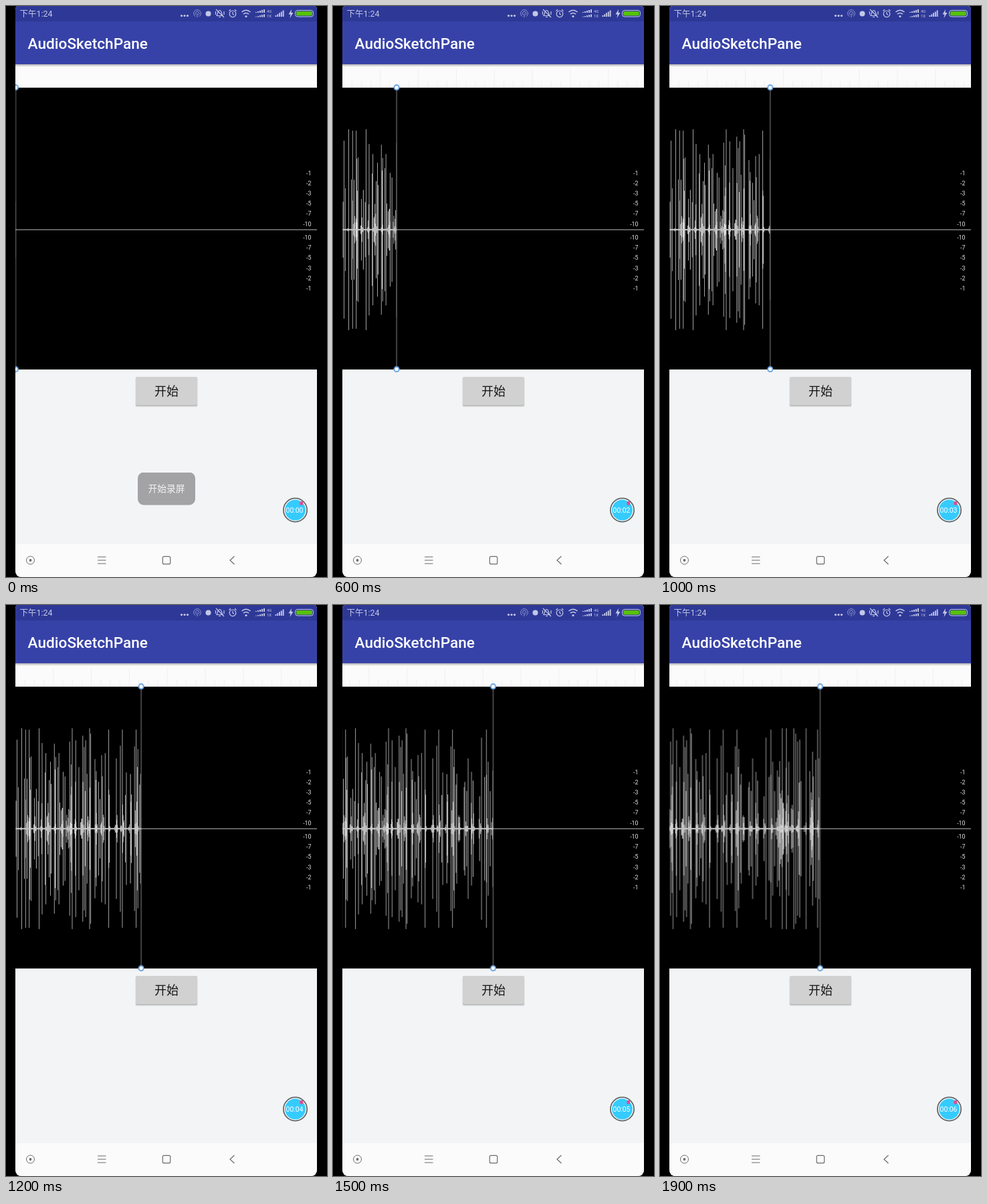
An HTML page for the animation above (2000 ms loop, 480 px wide and 853 px high).

```html
<!DOCTYPE html>
<html lang="zh">
<head>
<meta charset="utf-8">
<title>AudioSketchPane</title>
<style>
  html, body { margin: 0; width: 100%; height: 100%; overflow: hidden; background: #000; }
  svg { display: block; }
  text { font-family: Roboto, "Noto Sans CJK SC", "Noto Sans CJK", sans-serif; }
  .cursor, .scroll, .ruler, .toast, .digits { animation: 2s -4ms infinite; }
  .cursor { animation-name: cursor; }
  .scroll { animation-name: scroll; }
  .ruler { animation-name: ruler; animation-timing-function: step-end; }
  .toast { animation-name: toast; animation-timing-function: step-end; }
  .digits { animation-name: digits; }

  @keyframes cursor {
    0% { transform: translateX(14.4px); }
    5% { transform: translateX(14.4px); animation-timing-function: steps(7); }
    40% { transform: translateX(127.4px); animation-timing-function: steps(6); }
    70%, 100% { transform: translateX(239.5px); }
  }
  @keyframes scroll {
    0% { transform: none; }
    70% { transform: translateX(0); animation-timing-function: steps(5); }
    95%, 100% { transform: translateX(-79.5px); }
  }
  @keyframes ruler {
    0% { opacity: 0; }
    5% { opacity: 1; transform: none; }
    75% { opacity: 1; transform: translateX(-17px); }
    80%, 100% { opacity: 1; transform: translateX(-60px); }
  }
  @keyframes toast {
    0% { opacity: .5; transform: translateY(16.5px); }
    5% { opacity: 1; transform: none; }
    30%, 100% { opacity: 0; transform: none; }
  }
  @keyframes digits {
    0% { transform: none; animation-timing-function: steps(6); }
    90%, 100% { transform: translateY(-120px); }
  }
</style>
</head>
<body>
<svg width="100%" height="100%" viewBox="0 0 480 853" preserveAspectRatio="none">
  <defs>
    <clipPath id="phone"><path d="M14 5Q14 0 19 0H460Q465 0 465 5V843Q465 853 455 853H24Q14 853 14 843Z"/></clipPath>
    <linearGradient id="shade" x2="0" y2="1">
      <stop stop-color="#000" stop-opacity=".3"/><stop offset="1" stop-color="#000" stop-opacity="0"/>
    </linearGradient>
  </defs>
  <rect width="480" height="853"/>
  <g clip-path="url(#phone)">
    <rect x="14" width="451" height="853" fill="#f3f4f5"/>
    <rect x="14" y="87" width="451" height="35" fill="#fbfbfb"/>
    <rect x="14" y="804" width="451" height="49" fill="#fbfbfb"/>
    <rect x="14" width="451" height="23" fill="#2e3997"/>
    <rect x="14" y="23" width="451" height="64" fill="#3742a8"/>
    <path class="ruler" id="ticks" stroke="#f0f0f0"/>
    <rect x="14" y="87" width="451" height="4" fill="url(#shade)"/>
    <text x="32.5" y="64" font-size="22.6" font-weight="500" fill="#fff">AudioSketchPane</text>

    <!-- status bar -->
    <text x="20.5" y="16" font-size="12.5" fill="#c3c7e6">下午1:24</text>
    <g fill="#c3c7e6">
      <circle cx="262.5" cy="14.5" r="1.6"/><circle cx="267" cy="14.5" r="1.6"/><circle cx="271.5" cy="14.5" r="1.6"/>
      <circle cx="302.5" cy="11.5" r="4"/>
      <circle cx="359" cy="15.5" r="1.6"/>
      <path d="M427 5L422.5 12.5H425.5L424.5 18L429.5 10H426.5Z"/>
      <path id="bars"/>
      <text x="390" y="10" font-size="6">4G</text><text x="390" y="17" font-size="6">1X</text>
    </g>
    <g fill="none" stroke="#c3c7e6" stroke-width="1.2">
      <g stroke="#8f97cf" stroke-width="1">
        <path d="M283 15.6A5.4 5.4 0 1 1 289 15.6M284.4 13.4A2.8 2.8 0 1 1 287.6 13.4M286 11V17"/>
      </g>
      <path d="M315 14.5H324C322.5 13 323 7 319.5 6.5C316 7 317 12 315 14.5ZM318 16.5H321M314 5L326 17M313.5 8V13M326 8V13"/>
      <circle cx="339" cy="11.8" r="4.8"/><path d="M339 9V12L341 13.2M333.5 7.5L336 5.2M344.5 7.5L342 5.2"/>
      <path stroke-width="1.6" d="M352.5 9Q359 3.5 365.5 9M355 12.2Q359 8.8 363 12.2"/>
      <rect x="432.5" y="6.5" width="27" height="9.5" rx="3.5" stroke-width="1"/>
    </g>
    <rect x="434" y="8" width="24" height="6.5" rx="2.2" fill="#57c00a"/>

    <!-- recorder view -->
    <svg x="14" y="112" width="451" height="440" viewBox="14 112 451 440">
      <rect x="14" y="122" width="451" height="421"/>
      <g class="scroll" fill="none" stroke="#fff">
        <path id="peaks" stroke-width=".75" stroke-opacity=".85"/>
        <path id="murmur" stroke-width=".8" stroke-opacity=".9"/>
      </g>
      <g class="cursor">
        <rect y="122" width="451" height="421"/>
        <path d="M0 122V543" stroke="#85878c"/>
        <g fill="#fff" stroke="#6aa2e2" stroke-width="2">
          <circle cy="121.7" r="3.6"/><circle cy="542.7" r="3.6"/>
        </g>
      </g>
      <path d="M14 334.2H465" stroke="#bcbcbc"/>
      <g id="levels" fill="#e6e6e6" font-size="8.8" text-anchor="end"></g>
    </svg>

    <rect x="193.5" y="555" width="93" height="44" rx="2" fill="#000" opacity=".1"/>
    <rect x="194" y="554.5" width="92" height="43" rx="2" fill="#b9b9b9"/>
    <rect x="194" y="554" width="92" height="42" rx="2" fill="#d1d1d1"/>
    <text x="240" y="582" font-size="18" text-anchor="middle" fill="#161616">开始</text>

    <g class="toast">
      <rect x="197" y="680" width="86" height="49" rx="9" fill="#525356"/>
      <text x="240" y="709.5" font-size="13.7" text-anchor="middle" fill="#f4f4f4">开始录屏</text>
    </g>

    <!-- floating timer -->
    <circle cx="432.5" cy="753" r="17.6" fill="#fff" stroke="#62666a" stroke-width="1.8"/>
    <circle cx="432.5" cy="753" r="15.4" fill="#35cbff"/>
    <rect x="439.5" y="740" width="4.6" height="5.4" rx="1.5" fill="#e8488c"/>
    <g fill="#fff" font-size="10.4">
      <text x="438.6" y="756.8" text-anchor="end">00:0</text>
      <svg x="438.6" y="746" width="8" height="14"><g class="digits" id="seconds"></g></svg>
    </g>

    <!-- navigation -->
    <g fill="none" stroke="#6b6b6b" stroke-width="1.2">
      <circle cx="36.5" cy="828" r="6" stroke-width="1"/><circle cx="36.5" cy="828" r="1.3" fill="#6b6b6b"/>
      <path d="M137 823H149.5M137 828H149.5M137 833H149.5M341.5 822L335 828L341.5 834"/>
      <rect x="234.3" y="822.3" width="11.4" height="11.4" rx="2"/>
    </g>
  </g>
</svg>
<script>
const $ = id => document.getElementById(id);
const range = (n, f) => Array.from({ length: n }, (_, i) => f(i)).join('');
const spike = (x, h) => `M${x.toFixed(2)} ${(334.2 - h).toFixed(1)}v${(2 * h).toFixed(1)}`;

// Loud samples: position, half height
const loud = [
  [16.5, 133], [18.5, 62], [23.5, 150], [27.5, 75], [29.3, 148], [34.7, 148], [35.6, 106], [37.6, 108],
  [42.5, 46], [49.5, 150], [54, 128], [58.5, 84], [59.6, 113], [66.5, 100], [72.3, 127], [74.3, 107],
  [77.5, 92], [79.2, 113], [85.5, 85], [95.3, 130], [97.6, 96], [99, 150], [104.3, 132], [109, 92],
  [114.8, 139], [117, 122], [119.2, 132], [121.3, 82], [125, 150], [126.6, 142], [133, 104], [135, 86],
  [138.5, 70], [143, 110], [148.3, 113], [153.6, 148], [165, 105], [171, 124], [174, 148], [180, 84],
  [192.2, 123], [194.6, 148], [197.2, 119], [201, 82], [212, 62], [218, 105], [223, 85], [238, 136],
  [245.3, 148], [248, 100], [255, 87], [258.6, 101], [262.3, 150], [268.5, 150], [272, 100], [279.6, 150],
  [282.4, 142], [285.3, 130], [288.5, 133], [298, 150], [303.5, 86], [307.7, 115], [312.5, 103], [315.2, 148],
  [317.2, 105]
];
$('peaks').setAttribute('d', loud.map(([x, h]) => spike(x, h)).join(''));

let seed = 77;
const random = () => (seed = (seed * 16807) % 2147483647) / 2147483647;
const dense = x => (x > 90 && x < 99) || (x > 254 && x < 272);
$('murmur').setAttribute('d', range(440, i => {
  const x = 15 + i * 0.69;
  const swell = dense(x) ? 1.2 : Math.max(0, Math.sin(x * 0.62) + 0.5 * Math.sin(x * 0.23));
  const burst = random() < 0.09 ? 35 + 45 * random() : 0;
  return spike(x, 1 + swell * 32 * random() ** 2 + burst);
}));

$('ticks').setAttribute('d', range(38, i => {
  const top = i % 4 ? 112 : 94;
  return `M${(14 + i * 14.2).toFixed(1)} ${top}V122`;
}));

const bars = (x, bottom, count, step, width, height) => range(count, i => {
  const h = height * (i + 1) / count;
  return `M${x + i * step} ${bottom}v${-h}h${width}v${h}z`;
});
$('bars').setAttribute('d',
  bars(373, 10, 5, 3, 2, 5) + bars(373, 16.5, 5, 3, 2, 4) + bars(402.5, 16, 5, 2.8, 1.9, 9.5));

const levels = [1, 2, 3, 5, 7, 10];
$('levels').innerHTML = levels.map((v, i) =>
  [253 + 15.1 * i, 424.7 - 15.1 * i].map(y => `<text x="456.5" y="${y}">-${v}</text>`).join('')).join('');

$('seconds').innerHTML = range(7, i => `<text y="${10.8 + 20 * i}">${i}</text>`);
</script>
</body>
</html>
```
